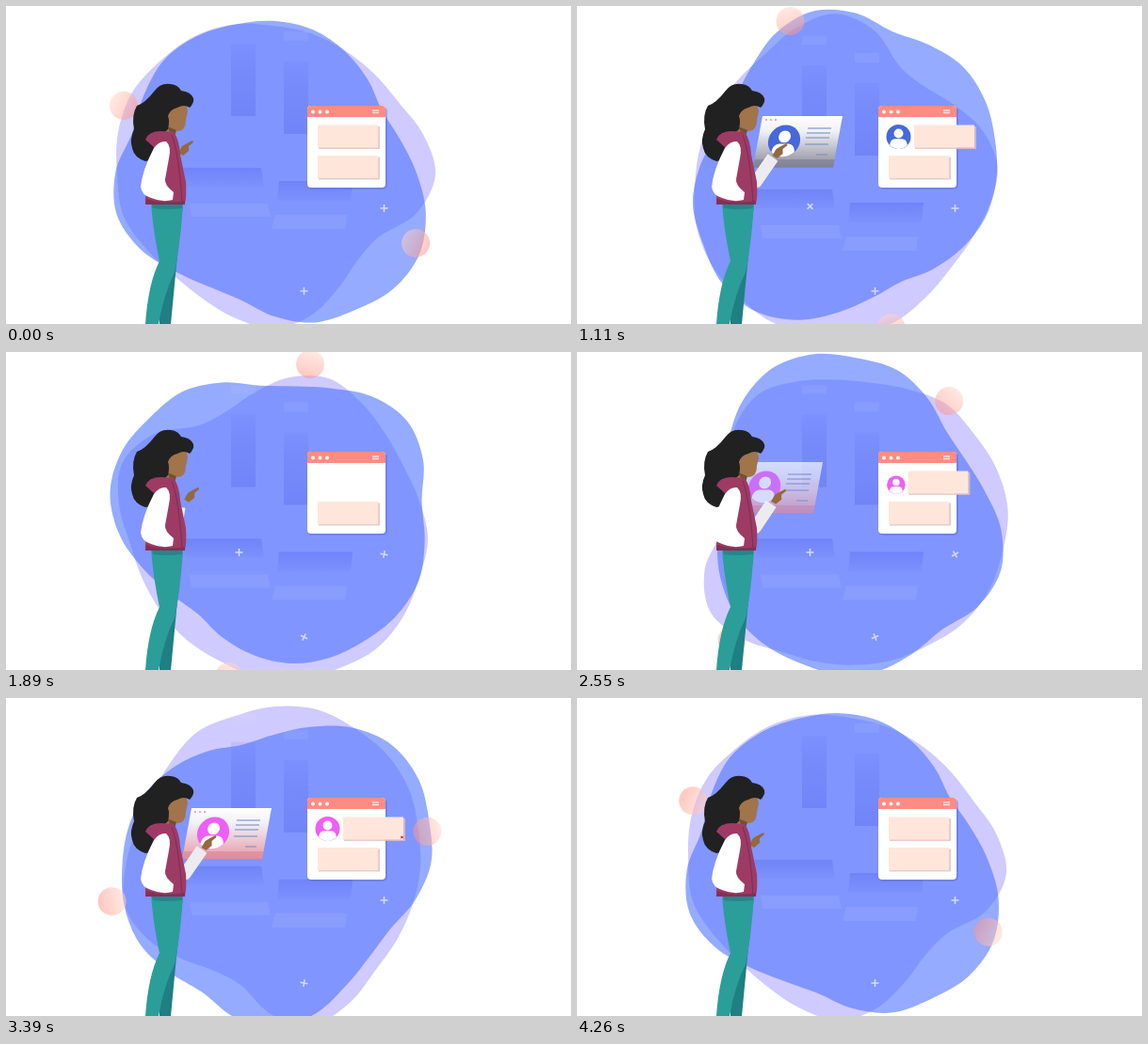
An HTML page for the animation above (4290 ms loop, 600x338 px).

```html
<!DOCTYPE html>
<html lang="en">
<head>
<meta charset="utf-8">
<title>Profile cards</title>
<style>
html, body { margin: 0; width: 100%; height: 100%; overflow: hidden; background: #fff; }
svg { display: block; width: 100vw; height: 100vh; }
</style>
</head>
<body>
<svg viewBox="0 0 600 338">
  <defs>
    <linearGradient id="ballFill">
      <stop offset="0" stop-color="#ff9385"/>
      <stop offset="1" stop-color="#ffd6c8"/>
    </linearGradient>
    <linearGradient id="barFill" x2="0" y2="1">
      <stop offset="0" stop-color="#5f73f0" stop-opacity=".12"/>
      <stop offset=".32" stop-color="#5f73f0" stop-opacity=".28"/>
      <stop offset="1" stop-color="#5f73f0" stop-opacity=".48"/>
    </linearGradient>
    <linearGradient id="slabFill" x2="0" y2="1">
      <stop offset="0" stop-color="#5f73f0" stop-opacity=".5"/>
      <stop offset="1" stop-color="#5f73f0" stop-opacity=".1"/>
    </linearGradient>
    <linearGradient id="panelFill" x2="0" y2="1">
      <stop offset="0" stop-color="#fff"/>
      <stop offset=".3" stop-color="#f0f0f8"/>
      <stop id="panelEnd" offset="1"/>
    </linearGradient>
    <g id="person" fill="#fff">
      <circle cy="-.27" r=".38"/>
      <path d="M-.72 .69C-.65 .1-.3 .18 0 .18S.65 .1 .72 .69Q0 1.3-.72 .69Z"/>
    </g>
    <g id="block">
      <rect x="1" y="1.5" width="65" height="24" fill="#e3c0ba" opacity=".8"/>
      <rect width="64" height="24" fill="#ffe6db"/>
    </g>
    <path id="plus" d="M-4 0H4M0-4V4" stroke="#d3dbff" stroke-width="1.5"/>
  </defs>

  <path id="lavender" fill="#cfcaff"/>
  <path id="blue" fill="#4e74ff" fill-opacity=".6"/>
  <g id="balls" fill="url(#ballFill)" opacity=".52">
    <circle cx="171.5" r="15"/>
    <circle cx="-171.5" r="15"/>
  </g>

  <g id="bars">
    <g fill="#fff">
      <path fill-opacity=".06" d="M239 9h26v9h-26zM295 27h26v10h-26z"/>
      <path fill-opacity=".07" d="M195 210h83l3 14h-84zM286 222h76l-2 15h-78z"/>
    </g>
    <path fill="url(#barFill)" d="M239 40h26v77h-26z"/>
    <path fill="url(#barFill)" d="M295 59h26v77h-26z"/>
    <path fill="url(#slabFill)" d="M188 172h83l3 20h-84z"/>
    <path fill="url(#slabFill)" d="M290 186h78l-2 21h-78z"/>
  </g>
  <use id="plusA" href="#plus"/>
  <use id="plusB" href="#plus"/>
  <use id="plusC" href="#plus"/>

  <g>
    <rect x="320" y="107" width="85" height="88" rx="5" fill="#5967cf" opacity=".4"/>
    <rect x="320" y="106" width="83" height="87" rx="4" fill="#fff"/>
    <path d="M320 118v-8q0-4 4-4h75q4 0 4 4v8z" fill="#ff8b84"/>
    <g fill="#fff"><circle cx="326" cy="112.500" r="1.900"/><circle cx="333.500" cy="112.500" r="1.900"/><circle cx="341" cy="112.500" r="1.900"/></g>
    <path d="M389 111h7M389 113.500h7" stroke="#ffe0dc" stroke-width="1.300"/>
    <use href="#block" x="331" y="159"/>
  </g>
  <g id="entry">
    <g id="avatar"><circle id="avatarDisc" r="1"/><use href="#person"/></g>
    <use id="entryBlock" href="#block" y="126.500"/>
  </g>
  <path id="cross" d="M-4-4L4 4M4-4L-4 4" stroke="#d8202c" stroke-width="3.600"/>

  <g id="panel">
    <path d="M197 117h85l-10 54h-85z" fill="url(#panelFill)"/>
    <path id="panelFoot" d="M188.500 163h85l-1.500 9h-85z" opacity=".55"/>
    <g fill="#ef8b95"><circle cx="201" cy="121" r="1"/><circle cx="206" cy="121" r="1"/><circle cx="211" cy="121" r="1"/></g>
    <g transform="matrix(17 0 -2 17 220 143.500)"><circle id="panelDisc" r="1"/><use href="#person"/></g>
    <path d="M245 130h25M244 135h25M243 140h25M242 147h25M254 158h12" stroke="#7e91c4" stroke-width="1.300" opacity=".75"/>
  </g>

  <path id="sleeve" fill="none" stroke="#ececf0" stroke-width="13" stroke-linejoin="round"/>
  <path id="hand" d="M-7 5L-3-2 2-5 8-8 9-6 4-2 4 3-2 8Z" fill="#94693f"/>

  <g id="woman">
    <path d="M163 210h25L181 275 175 338h-12z" fill="#1f7f82"/>
    <path d="M154 209h34Q185 255 179 283 168 305 162 338H148Q151 295 163 271 156 238 154 209Z" fill="#2b9e99"/>
    <path d="M155 211h32v4q-18 2-31 0z" fill="#23878a"/>
    <path d="M169 118L178 108 191 104 193 112 191 121Q191 132 183 133L178 132 179 146 164 142Z" fill="#a1744a"/>
    <path d="M171 128L181 132 178 142Z" fill="#74502f"/>
    <path d="M157 91Q164 81 175 83 183 84 186 90 196 91 199 98 200 103 195 108 189 104 182 108 174 110 172 117 174 122 172 131L160 142Q159 164 148 165 136 161 134 151 131 142 136 131 133 116 139 106 148 103 157 91Z" fill="#212121"/>
    <path d="M148 142Q151 133 165 133L178 134Q184 142 185 158L191 187Q192 203 190 210H148Q147 200 152 190L158 151Z" fill="#9d3b65"/>
    <path d="M176 137Q184 158 187 210" fill="none" stroke="#813052" stroke-width="1.200"/>
    <path d="M157 151Q163 143 170 144 176 149 173 162L169 184Q168 190 178 198L177 206Q166 209 154 204 144 201 143 192 145 174 157 151Z" fill="#fff"/>
    <path d="M149 205Q166 211 190 207V211H148Z" fill="#852f55"/>
  </g>
</svg>
<script>
const LOOP = 4290;
// Outline radii at 15 degree steps, clockwise from the right.
const BLUE_RADII = [150, 166, 177, 177, 170, 166, 154, 141, 141, 150, 165, 174,
  169, 157, 161, 167, 166, 162, 160, 156, 148, 139, 131, 137];
const LAVENDER_RADII = [172, 157, 130, 127, 138, 154, 163, 157, 151, 150, 156, 165,
  166, 171, 174, 171, 170, 166, 159, 156, 153, 152, 154, 165];

const el = Object.fromEntries([...document.querySelectorAll('[id]')].map(e => [e.id, e]));
const set = (id, attrs) => {
  for (const [name, value] of Object.entries(attrs)) el[id].setAttribute(name, value);
};
const clamp = v => Math.min(1, Math.max(0, v));
const linear = (t, a, b) => clamp((t - a) / (b - a));
const ease = (t, a, b) => {
  const p = linear(t, a, b);
  return p < .5 ? 4 * p ** 3 : 1 - 4 * (1 - p) ** 3;
};
const mix = (a, b, p) => a + (b - a) * p;

// Closed Catmull-Rom curve through the polar points.
function blobPath(radii) {
  const n = radii.length;
  const at = i => {
    const k = (i + n) % n, angle = k / n * 2 * Math.PI;
    return [radii[k] * Math.cos(angle), radii[k] * Math.sin(angle)];
  };
  let d = 'M' + at(0);
  for (let i = 0; i < n; i++) {
    const [before, from, to, after] = [at(i - 1), at(i), at(i + 1), at(i + 2)];
    const c1 = from.map((v, k) => v + (to[k] - before[k]) / 6);
    const c2 = to.map((v, k) => v - (after[k] - from[k]) / 6);
    d += `C${c1} ${c2} ${to}`;
  }
  return d + 'Z';
}

const spin = (id, x, y, angle, scale = 1) =>
  set(id, { transform: `translate(${x} ${y}) rotate(${angle}) scale(${scale})` });

function drawBackground(t) {
  const turn = t / LOOP * 360;
  spin('blue', 285.5, 176, turn);
  spin('lavender', 284, 180, -turn);
  spin('balls', 280, 179, 205.2 + turn / 2);
  const drop = 26.5 * (ease(t, 300, 1500) - ease(t, 2620, 3900));
  set('bars', { transform: `translate(0 ${drop})` });
  spin('plusA', 401.5, 215, 90 * linear(t, 1750, 2950));
  spin('plusB', 316.5, 303, 90 * (linear(t, 1500, 2900) + linear(t, 3300, 4140)));
  spin('plusC', 247.5, 213, 90 * linear(t, 700, 1500),
    linear(t, 700, 1000) - linear(t, 2700, 2980));
}

function drawCards(t) {
  const second = t > 2050;
  const enter = second ? ease(t, 2200, 2780) : ease(t, 350, 930);
  const leave = second ? ease(t, 3830, 4200) : ease(t, 1480, 1850);
  const shown = enter * (1 - leave);
  const accent = second ? '#ee5ff5' : '#4668da';

  set('panel', {
    transform: `translate(${-85 * (1 - shown)} 0)`,
    opacity: clamp(shown * 1.35 - .35)
  });
  set('panelDisc', { fill: accent });
  set('panelEnd', { 'stop-color': second ? '#e79aa5' : '#8d8d98' });
  set('panelFoot', { fill: second ? '#d98294' : '#777b94' });

  // The first entry leaves to the right, the second one slides back.
  const slot = second ? shown : enter;
  set('entry', {
    transform: `translate(${second ? 0 : 50 * leave} 0)`,
    opacity: second ? linear(t, 2080, 2220) : 1 - leave
  });
  set('entryBlock', { x: mix(331, 358, slot) });
  spin('avatar', mix(331, 341.5, slot), mix(148, 139, slot), 0, 13 * slot);
  set('avatarDisc', { fill: accent });
  spin('cross', 420.5, 148, 0, ease(t, 3300, 3520) - ease(t, 3830, 4000));
}

function drawArm(t) {
  const reach = ease(t, 300, 850) - ease(t, 1500, 2150)
    + ease(t, 2150, 2680) - ease(t, 3800, 4200);
  const wristX = mix(176, 208, reach), wristY = mix(166, 161, reach);
  set('sleeve', { d: `M172 176L${mix(178, 190, reach)} ${mix(182, 187, reach)}L${wristX} ${wristY}` });
  set('hand', { transform: `translate(${mix(190, 214.5, reach)} ${mix(151, 154, reach)})` });
}

function draw(t) {
  drawBackground(t);
  drawCards(t);
  drawArm(t);
}

set('blue', { d: blobPath(BLUE_RADII) });
set('lavender', { d: blobPath(LAVENDER_RADII) });
draw(0);
const start = performance.now();
function tick() {
  draw((performance.now() - start) % LOOP);
  requestAnimationFrame(tick);
}
requestAnimationFrame(tick);
</script>
</body>
</html>
```
